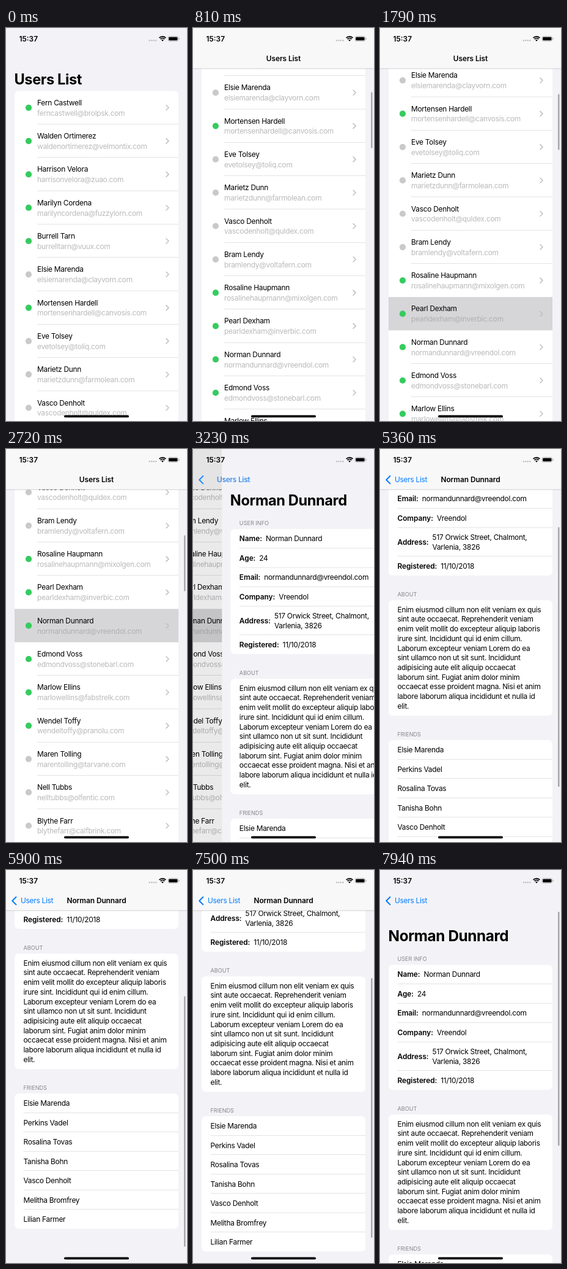
An HTML page with a canvas that plays this animation: 296 px wide and 640 px high, repeating every 8000 ms.

```html
<!DOCTYPE html>
<html lang="en">
<head>
<meta charset="utf-8">
<title>Users List</title>
<style>
html, body { margin: 0; width: 100%; height: 100%; overflow: hidden; background: #f3f3f7; }
canvas { display: block; width: 100vw; height: 100vh; }
</style>
</head>
<body>
<canvas id="stage"></canvas>
<script>
const W = 296, H = 640, LOOP = 8000;
const BG = '#f3f3f7', BAR = '#f8f8f9', BLUE = '#007aff', LINE = '#c6c6c8';
const FAMILY = 'Inter, "Liberation Sans", sans-serif';
const BODY = { size: 11.9, weight: 400, gap: -0.27 };
const BOLD = { size: 11.9, weight: 600, gap: -0.07 };
const LARGE = { size: 23.6, weight: 700, gap: -0.4 };
const SMALL = { size: 9.1, weight: 400, gap: 0 };

const BAR_H = 65.8, TITLE_H = 39, LEFT = 14, RIGHT = 282;
const ROW = 54.3, LIST_TOP = 102.5;
const CELL = 31.46, MAX_SCROLL = 223;

// name | mail domain | online
const users = `Fern Castwell|brolpsk|1
Walden Ortimerez|velmontix|1
Harrison Velora|zuao|1
Marilyn Cordena|fuzzylorn|1
Burrell Tarn|vuux|1
Elsie Marenda|clayvorn|0
Mortensen Hardell|canvosis|1
Eve Tolsey|toliq|0
Marietz Dunn|farmolean|0
Vasco Denholt|quldex|0
Bram Lendy|voltafern|0
Rosaline Haupmann|mixolgen|1
Pearl Dexham|inverbic|1
Norman Dunnard|vreendol|1
Edmond Voss|stonebarl|1
Marlow Ellins|fabstrelk|1
Wendel Toffy|pranolu|1
Maren Tolling|tarvane|0
Nell Tubbs|olfentic|0
Blythe Farr|calfbrink|0`.split('\n').map(line => {
  const [name, domain, online] = line.split('|');
  const mail = name.toLowerCase().replace(' ', '') + '@' + domain + '.com';
  return { name, mail, online: online === '1' };
});
const person = users[13];
const info = [
  ['Name:', person.name],
  ['Age:', '24'],
  ['Email:', person.mail],
  ['Company:', 'Vreendol'],
  ['Address:', '517 Orwick Street, Chalmont,', 'Varlenia, 3826'],
  ['Registered:', '11/10/2018']
];
const about = `Enim eiusmod cillum non elit veniam ex quis
sint aute occaecat. Reprehenderit veniam
enim velit mollit do excepteur aliquip laboris
irure sint. Incididunt qui id enim cillum.
Laborum excepteur veniam Lorem do ea
sint ullamco non ut sit sunt. Incididunt
adipisicing aute elit aliquip occaecat
laborum sint. Fugiat anim dolor minim
occaecat esse proident magna. Nisi et anim
labore laborum aliqua incididunt et nulla id
elit.`.split('\n');
const friends = ['Elsie Marenda', 'Perkins Vadel', 'Rosalina Tovas', 'Tanisha Bohn',
  'Vasco Denholt', 'Melitha Bromfrey', 'Lilian Farmer'];

// Stepped tracks: [start time, value]
const listScroll = [[0, 0], [500, 24], [610, 158], [710, 246], [810, 296], [910, 316],
  [1900, 482], [2220, 548]];
const push = [[0, 0], [2900, 0.14], [3010, 0.56], [3120, 0.84], [3240, 0.96], [3350, 1]];
const pageScroll = [[0, 0], [4470, 38], [4580, 82], [4680, 108], [4790, 120],
  [5360, 128], [5470, 165], [5580, 205], [5690, 236], [5790, 244], [5900, 238],
  [6010, 231], [6130, 227], [6250, 224], [6360, 223],
  [7500, 201], [7610, 130], [7720, 50], [7830, -10], [7940, -24]];
const touched = [[0, -1], [1790, 12], [1900, -1], [2720, 13]];

function at(track, t) {
  let value = track[0][1];
  for (const [start, v] of track) if (t >= start) value = v;
  return value;
}

const canvas = document.getElementById('stage');
const ctx = canvas.getContext('2d');

function setFont(style, scale = 1) {
  ctx.font = `${style.weight} ${style.size * scale}px ${FAMILY}`;
  ctx.letterSpacing = style.gap * scale + 'px';
}

function text(str, x, y, style = BODY, color = '#000', scale = 1) {
  setFont(style, scale);
  ctx.fillStyle = color;
  ctx.fillText(str, x, y);
  return ctx.measureText(str).width;
}

function rect(x, y, w, h, color) {
  ctx.fillStyle = color;
  ctx.fillRect(x, y, w, h);
}

function pill(x, y, w, h, r, color) {
  ctx.fillStyle = color;
  ctx.beginPath();
  ctx.roundRect(x, y, w, h, r);
  ctx.fill();
}

function dot(x, y, r, color) {
  ctx.fillStyle = color;
  ctx.beginPath();
  ctx.arc(x, y, r, 0, Math.PI * 2);
  ctx.fill();
}

function chevron(x, y, dx, dy, width, color) {
  ctx.strokeStyle = color;
  ctx.lineWidth = width;
  ctx.lineCap = ctx.lineJoin = 'round';
  ctx.beginPath();
  ctx.moveTo(x + dx, y - dy);
  ctx.lineTo(x, y);
  ctx.lineTo(x + dx, y + dy);
  ctx.stroke();
}

const card = (y, h) => pill(LEFT, y, RIGHT - LEFT, h, 7, '#fff');
const divider = (x, y) => rect(x, y - 0.5, RIGHT - x, 0.5, LINE);
const thumb = (y, h) => pill(291, y, 2.5, h, 1.2, '#a8a8ab');

function centredTitle(str, x, alpha = 1) {
  setFont(BOLD);
  ctx.globalAlpha = alpha;
  text(str, x - ctx.measureText(str).width / 2, 54.3, BOLD);
  ctx.globalAlpha = 1;
}

function bar(scroll) {
  const collapsed = scroll > TITLE_H - 2;
  rect(0, 0, W, BAR_H, collapsed ? BAR : BG);
  if (collapsed) rect(0, BAR_H, W, 0.6, '#b5b5b8');
  return collapsed;
}

function largeTitle(str, scroll) {
  const stretch = 1 + Math.max(0, -scroll) * 0.0013;
  ctx.save();
  ctx.beginPath();
  ctx.rect(0, BAR_H, W, H);
  ctx.clip();
  text(str, LEFT - 0.5, 91.5 - scroll, LARGE, '#000', stretch);
  ctx.restore();
}

function drawList(scroll, active) {
  rect(0, 0, W, H, BG);
  const top = LIST_TOP - scroll;
  card(top, ROW * 40);
  users.forEach((user, i) => {
    const y = top + i * ROW, mid = y + 27.3;
    if (y > H || y < -ROW) return;
    if (i === active) rect(LEFT, y, RIGHT - LEFT, ROW, '#d6d6d8');
    dot(37, mid, 5.1, user.online ? '#36cb5f' : '#c9c9cb');
    text(user.name, 51, mid - 4);
    text(user.mail, 51, mid + 12.8, BODY, i === active ? '#b0b0b3' : '#bababc');
    chevron(266, mid, -4, 4, 1.5, '#bfbfc3');
    if (i !== active && i + 1 !== active) divider(51, y + ROW);
  });
  const collapsed = bar(scroll);
  largeTitle('Users List', scroll);
  if (scroll > 0) thumb(68 + Math.max(0, scroll - TITLE_H) * 0.1425, 91);
  return collapsed;
}

function drawInfo(top) {
  text('USER INFO', 28.5, top - 6.5, SMALL, '#85858b');
  card(top, 203.7);
  let y = top;
  info.forEach(([label, ...lines], i) => {
    const h = lines.length > 1 ? 46.4 : CELL;
    const mid = y + h / 2 + 4.3;
    const x = 28.5 + text(label, 28.5, mid, BOLD) + 6;
    lines.forEach((line, n) => text(line, x, mid + (n - (lines.length - 1) / 2) * 15.7));
    y += h;
    if (i < info.length - 1) divider(28.5, y);
  });
}

function drawFriends(top) {
  text('FRIENDS', 28.5, top - 6.2, SMALL, '#85858b');
  card(top, CELL * friends.length);
  friends.forEach((name, i) => {
    text(name, 28.5, top + i * CELL + 20.3);
    if (i) divider(28.5, top + i * CELL);
  });
}

function drawPage(scroll, showThumb) {
  rect(0, 0, W, H, BG);
  drawInfo(130.4 - scroll);
  text('ABOUT', 28.5, 368 - scroll, SMALL, '#85858b');
  card(374.2 - scroll, 188);
  about.forEach((line, i) => text(line, 28.5, 393.7 + i * 15.72 - scroll));
  drawFriends(602 - scroll);
  const collapsed = bar(scroll);
  largeTitle(person.name, scroll);
  if (collapsed) centredTitle(person.name, W / 2);
  if (!showThumb) return;
  const past = Math.max(0, scroll - MAX_SCROLL), pulled = Math.max(0, -scroll);
  const full = 405 + 18 * Math.min(1, Math.max(0, scroll / TITLE_H));
  const inner = Math.min(MAX_SCROLL, scroll);
  const y = 68 + Math.max(0, inner - TITLE_H) * 0.666;
  thumb(y + past, full - past - pulled);
}

function drawStatus() {
  text('15:37', 21.5, 22.2, { size: 11.9, weight: 600, gap: 0 });
  for (let i = 0; i < 4; i++) dot(234.8 + i * 3.5, 20.3, 1.2, '#bdbdc1');

  ctx.strokeStyle = '#000';
  ctx.lineCap = 'butt';
  ctx.lineWidth = 1.8;
  for (const r of [4.6, 7.4]) {
    ctx.beginPath();
    ctx.arc(256, 21.2, r, -Math.PI * 0.76, -Math.PI * 0.24);
    ctx.stroke();
  }
  ctx.fillStyle = '#000';
  ctx.beginPath();
  ctx.moveTo(256, 21.8);
  ctx.arc(256, 21.4, 2.6, -Math.PI * 0.76, -Math.PI * 0.24);
  ctx.fill();

  ctx.strokeStyle = '#a9a9ad';
  ctx.lineWidth = 0.7;
  ctx.beginPath();
  ctx.roundRect(264.9, 13.5, 16.8, 8, 2.4);
  ctx.stroke();
  pill(266.1, 14.7, 14.4, 5.6, 1.4, '#000');
  pill(282.5, 16, 1.1, 3, 0.5, '#a9a9ad');
}

function drawBack(p) {
  ctx.globalAlpha = p;
  chevron(10.3, 50.2, 6.2, 6.2, 2, BLUE);
  text('Users List', 24 + (1 - p) * 96, 54.3, BODY, BLUE);
  ctx.globalAlpha = 1;
}

function draw(t) {
  const p = at(push, t);
  if (p < 1) {
    ctx.save();
    ctx.translate(-W * 0.3 * p, 0);
    const collapsed = drawList(at(listScroll, t), at(touched, t));
    ctx.restore();
    if (p > 0) rect(0, 0, W, H, `rgba(0,0,0,${0.1 * p})`);
    else if (collapsed) centredTitle('Users List', W / 2);
  }
  if (p > 0) {
    ctx.save();
    ctx.translate(W * (1 - p), 0);
    drawPage(at(pageScroll, t), t >= 4360);
    ctx.restore();
    if (p < 1) centredTitle('Users List', W / 2 - 97 * p, 1 - p);
    drawBack(p);
  }
  drawStatus();
  pill(95, 630.6, 106, 3.6, 1.8, '#000');
}

function frame(now) {
  const ratio = window.devicePixelRatio || 1;
  const w = Math.round(W * ratio), h = Math.round(H * ratio);
  if (canvas.width !== w || canvas.height !== h) {
    canvas.width = w;
    canvas.height = h;
  }
  ctx.setTransform(ratio, 0, 0, ratio, 0, 0);
  draw(now % LOOP);
  requestAnimationFrame(frame);
}
requestAnimationFrame(frame);
</script>
</body>
</html>
```
